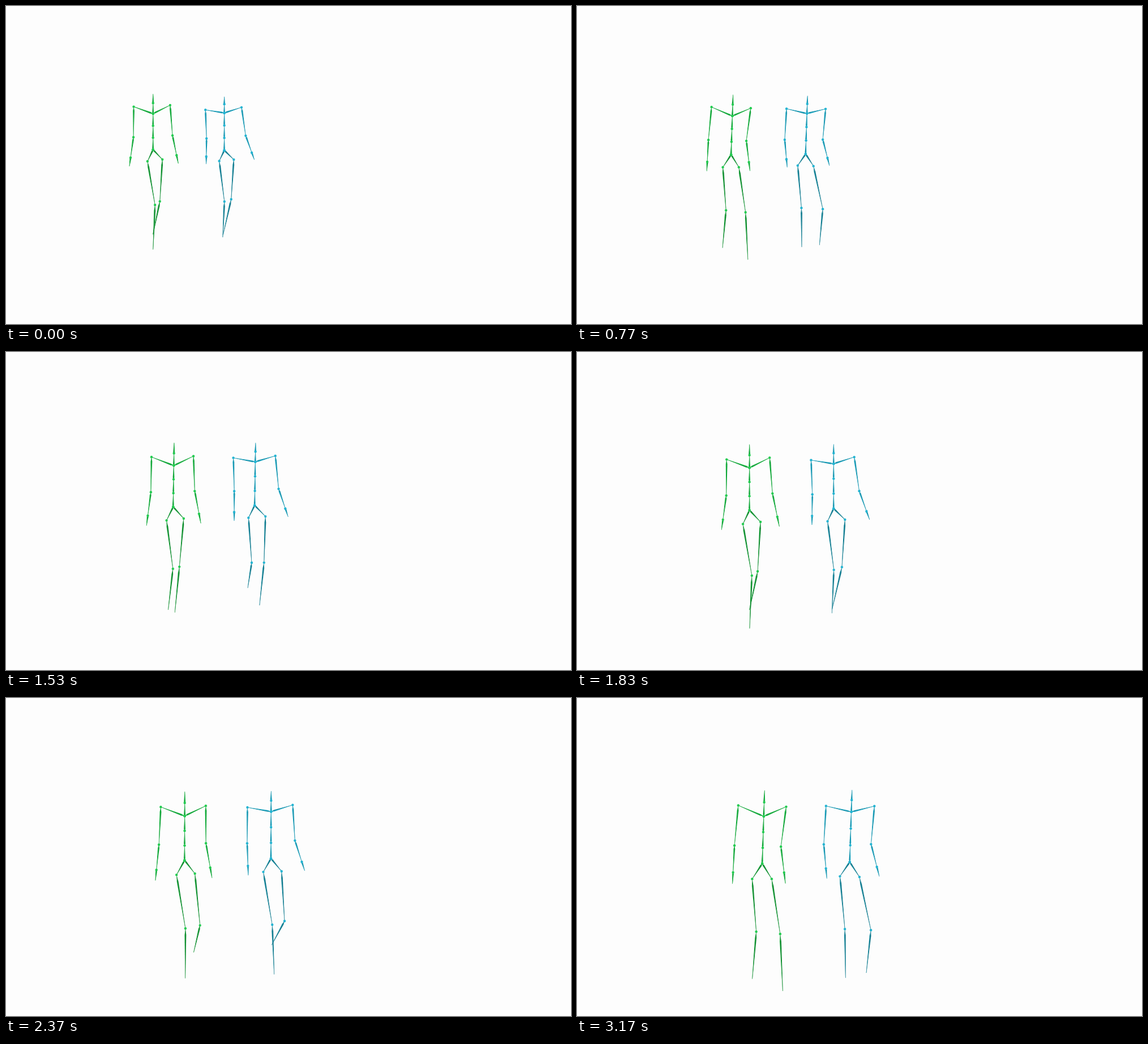
An HTML page with a canvas for the animation above (3210 ms loop, 998 by 561 pixels).

```html
<!DOCTYPE html>
<html lang="en">
<head>
<meta charset="utf-8">
<title>Two walking skeletons</title>
<style>
html, body { margin: 0; width: 100%; height: 100%; overflow: hidden; background: #fdfdfd; }
canvas { display: block; }
</style>
</head>
<body>
<canvas id="stage" width="998" height="561"></canvas>
<script>
const LOOP = 3.21;
const ctx = document.getElementById('stage').getContext('2d');
const { cos, PI } = Math;

// Bone offsets at rest, in units of the spine length
const green = {
  arm: ['#10b83c', '#049a2c'], leg: ['#0aa02e', '#048024'], dot: '#22cc50',
  x: t => 256 + 26 * t - 0.8 * t * t,
  y: t => 251.9 + 15.5 * t - 0.8 * t * t,
  size: t => 63.3 + 6.3 * t,
  sway: 4, lag: 0, head: 0.55,
  left: {
    shoulder: [-0.54, -0.215], upperArm: [-0.044, 0.85], forearm: [-0.055, 0.57],
    hip: [-0.184, 0.327], thigh: [0.142, 1.16], shin: [-0.078, 0.985]
  },
  right: {
    shoulder: [0.476, -0.22], upperArm: [-0.025, 0.845], forearm: [0.09, 0.55],
    hip: [0.231, 0.3], thigh: [0.045, 1.167], shin: [-0.061, 0.985]
  }
};

const blue = {
  arm: ['#18a8c6', '#088aa4'], leg: ['#0c889e', '#067084'], dot: '#22b4d2',
  x: t => 379.3 + 41 * t - 2.2 * t * t,
  y: t => 253.2 + 11.7 * t,
  size: t => 66 + 7.1 * t,
  sway: 6.8, lag: 0.6, head: 0.435,
  left: {
    shoulder: [-0.505, -0.1], upperArm: [-0.008, 0.765], forearm: [0.018, 0.48],
    hip: [-0.165, 0.285], thigh: [0.109, 1.06], shin: [-0.024, 0.85]
  },
  right: {
    shoulder: [0.46, -0.13], upperArm: [0.02, 0.758], forearm: [0.139, 0.452],
    hip: [0.224, 0.273], thigh: [0.08, 1.06], shin: [-0.139, 0.85]
  }
};

// The stride slows a little as the walkers come closer.
const stride = t => -3 + 4.2 * t - 0.41 * t * t;

// Foreshortening of the shin: a quick lift, then a long stance
const lift = p => -0.28 * cos(p - 1.1) - 0.12 * cos(2 * p - 2.8);

// Swing added to each bone; a is the body phase, p the leg phase.
const swing = {
  left: (a, p) => ({
    shoulder: [0, -0.02 * cos(a - 0.5)],
    upperArm: [-0.037 * cos(a), 0],
    forearm: [0.025 * cos(a), 0],
    hip: [-0.03 * cos(a), 0],
    thigh: [-0.082 * cos(p - 0.75), -0.065 * cos(p - 0.75)],
    shin: [-0.075 * cos(p - 1.4), lift(p)]
  }),
  right: (a, p) => ({
    shoulder: [0, 0.02 * cos(a - 0.5)],
    upperArm: [-0.092 * cos(a - 0.25), 0],
    forearm: [-0.024 * cos(a - 0.25), 0],
    hip: [-0.03 * cos(a), 0.025 * cos(a)],
    thigh: [0.15 * cos(p + 0.55), 0],
    shin: [0.144 * cos(p - 0.55), lift(p + PI)]
  })
};

const along = (a, b, k) => [a[0] + (b[0] - a[0]) * k, a[1] + (b[1] - a[1]) * k];

function bone(a, b, [light, dark]) {
  const dx = b[0] - a[0], dy = b[1] - a[1], len = Math.hypot(dx, dy) || 1;
  const nx = -dy / len, ny = dx / len, [kx, ky] = along(a, b, 0.13);
  for (const [side, color] of [[1.4, light], [-1.4, dark]]) {
    ctx.fillStyle = color;
    ctx.beginPath();
    ctx.moveTo(...a);
    ctx.lineTo(kx + nx * side, ky + ny * side);
    ctx.lineTo(b[0] + nx * side * 0.2, b[1] + ny * side * 0.2);
    ctx.lineTo(...b);
    ctx.fill();
  }
  ctx.strokeStyle = dark;
  ctx.lineWidth = 0.4;
  ctx.beginPath();
  ctx.moveTo(...a);
  ctx.lineTo(...b);
  ctx.stroke();
}

function dot(p, color) {
  ctx.fillStyle = color;
  ctx.beginPath();
  ctx.arc(p[0], p[1], 2.2, 0, 2 * PI);
  ctx.fill();
}

function draw(body, t) {
  const a = stride(t), p = a - body.lag, size = body.size(t);
  const move = (from, x, y) => [from[0] + x * size, from[1] + y * size];
  const pelvis = [body.x(t) - body.sway * cos(a - 0.55), body.y(t) - 2.5 * cos(a - 1.1)];
  const lean = 0.018 + 0.021 * cos(a - 0.75);
  const chest = move(pelvis, lean, -1);
  const crown = move(chest, lean * body.head, -body.head);

  const dots = [];
  const chain = (joints, shades) => joints.slice(1).forEach((end, i) => {
    bone(joints[i], end, shades);
    dots.push(joints[i]);
  });

  for (const side of ['left', 'right']) {
    const rest = body[side], shift = swing[side](a, p);
    const limb = (root, names) => names.reduce((joints, name) => {
      const [x, y] = rest[name], [dx, dy] = shift[name];
      return [...joints, move(joints[joints.length - 1], x + dx, y + dy)];
    }, [root]);
    const arm = limb(chest, ['shoulder', 'upperArm', 'forearm']);
    const hand = along(arm[2], arm[3], 1.42);
    chain(limb(pelvis, ['hip', 'thigh', 'shin']), body.leg);
    chain([...arm, hand], body.arm);
  }
  const spine = [0, 1 / 3, 2 / 3, 1].map(k => along(pelvis, chest, k));
  chain([...spine, along(chest, crown, 0.54), crown], body.arm);
  dots.forEach(d => dot(d, body.dot));
}

function frame() {
  const t = performance.now() / 1000 % LOOP;
  ctx.fillStyle = '#fdfdfd';
  ctx.fillRect(0, 0, 998, 561);
  draw(green, t);
  draw(blue, t);
  requestAnimationFrame(frame);
}
frame();
</script>
</body>
</html>
```
